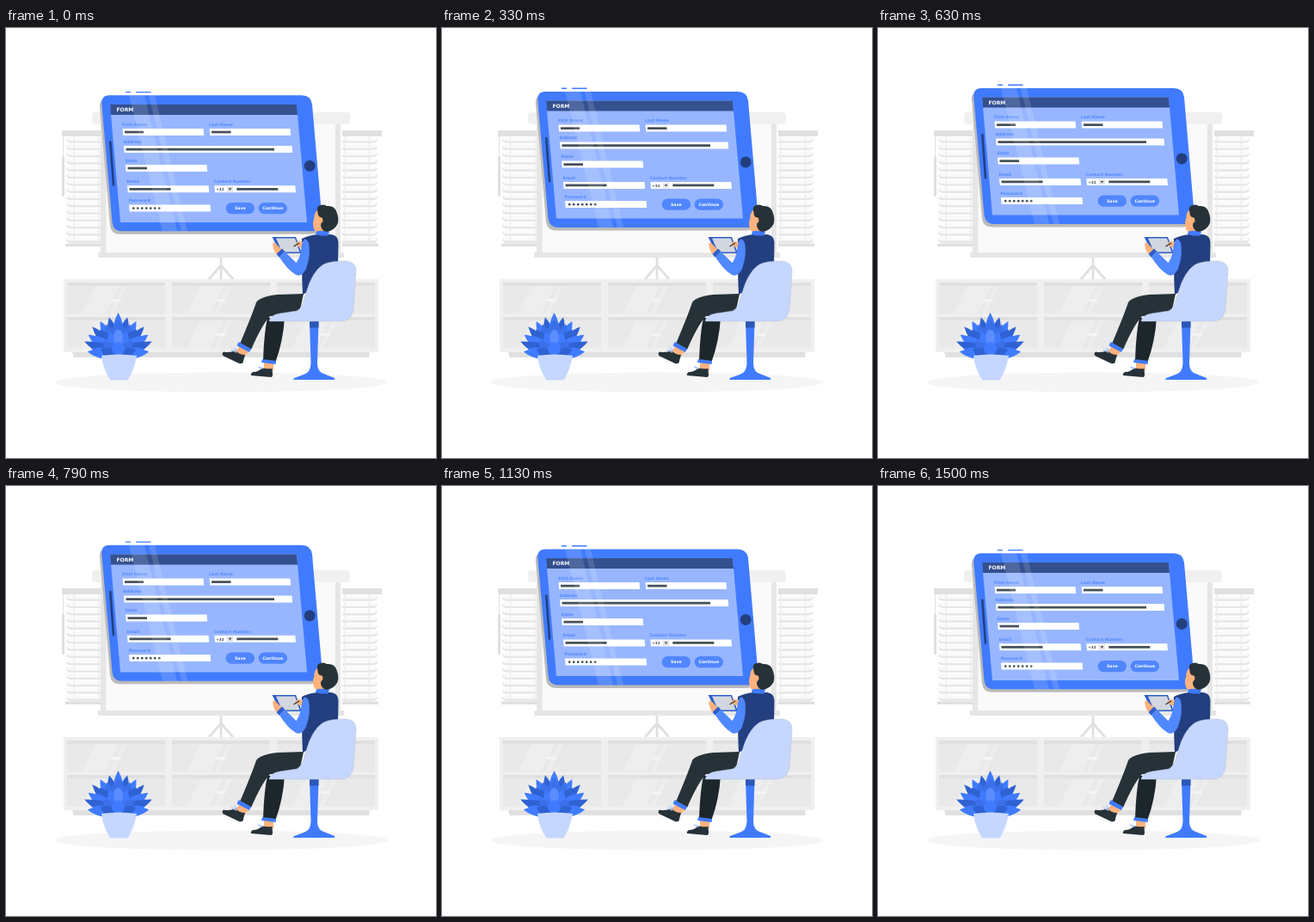
An HTML page that plays this animation: 500 px wide and 500 px high, repeating every 1540 ms.

```html
<!DOCTYPE html>
<html lang="en">
<head>
<meta charset="utf-8">
<title>Form on a tablet</title>
<style>
html, body { margin: 0; width: 100%; height: 100%; overflow: hidden; background: #fff; }
svg { display: block; width: 100%; height: 100%; }
text { font-family: "DejaVu Sans", Inter, sans-serif; font-weight: 700; font-size: 4.7px; }
.blue { fill: #407bff; }
.navy { fill: #233f80; }
.pale { fill: #c6d7ff; }
.dark { fill: #263238; }
.skin { fill: #ffb27d; }
.grey { fill: #e0e0e0; }
</style>
</head>
<body>
<svg viewBox="0 0 500 500">
  <ellipse cx="250" cy="412" rx="193.500" ry="11.500" fill="#f5f5f5"/>

  <g id="blind">
    <g id="slats"></g>
    <path d="M79.500 126V251M108 126V251" stroke="#ebebeb" stroke-width="1.200"/>
    <path class="grey" d="M65 119h46v7H65zM69 250.500h42v3.500H69z"/>
  </g>
  <use href="#blind" transform="matrix(-1 0 0 1 502 0)"/>
  <path d="M66.500 126v24" stroke="#e0e0e0"/>
  <rect class="grey" x="65" y="149" width="3" height="47" rx="1"/>

  <rect x="100" y="98" width="300" height="14" rx="4" fill="#f0f0f0"/>
  <path fill="#e6e6e6" d="M110 112h279v150H110z"/>
  <path fill="#fafafa" d="M116.500 112H383v150H116.500z"/>
  <rect x="107" y="261" width="286" height="6" rx="1" fill="#e6e6e6"/>
  <path d="M250 267v25M250 276L236 292M250 276L264 292" fill="none" stroke="#e0e0e0" stroke-width="2.800"/>

  <path fill="#f0f0f0" d="M67 292h366v85H67z"/>
  <path class="grey" d="M77 377h346l-1 6H79z"/>
  <g id="doors"></g>

  <g id="tablet">
    <path class="blue" d="M139 74h6v1.300h-6zM151 74h17.500v1.300H151z"/>
    <path fill="#bababa" transform="translate(-2.500 3.500)" d="M121 78.300H343Q354 78.300 355.300 89L367 225Q368 236.300 357 236.300H135Q124.500 236.300 123.500 226L111.500 89Q110.500 78.300 121 78.300z"/>
    <path class="blue" d="M120 78.300H344Q354.500 78.300 356 89L367.700 225Q368.500 236.300 358 236.300H135Q124.500 236.300 123.500 226L111.300 89Q110.500 78.300 120 78.300z"/>
    <path fill="#97b6ff" d="M121 89H338L350 226H133z"/>
    <path fill="#34508f" d="M121 89H338L339 101H122z"/>
    <path d="M121.300 132.500L125 182.500" stroke="#233f80" stroke-width="2.600" stroke-linecap="round"/>
    <circle class="navy" cx="353.200" cy="160.300" r="6.500"/>
    <text x="128.500" y="97.400" fill="#fff" style="font-size:6px">FORM</text>
    <g id="form"></g>
    <path fill="#fff" opacity=".13" d="M143 78.300h18L199 236.300h-17zM166 78.300h7L211 236.300h-7z"/>
  </g>

  <g id="plant"></g>

  <!-- person -->
  <path fill="#1c262b" d="M304 337H324Q322 365 313.500 388L299 386Q300 355 304 337z"/>
  <path class="dark" d="M346 309L316 310Q296 312 291 319Q286 334 272 367L285 374Q297 346 307 335Q326 335 341 332z"/>
  <path class="skin" d="M272 370L283 376L277 382L267 376zM300 389h11v9l-11 -1z"/>
  <path class="dark" d="M253 376.500Q250 379 253 381.500L271 390Q276 391 276 387L278 380Q271 380 267 375Q260 378 253 376.500zM287 400Q284 402 285 404L308 406Q310 406 310 403L309.500 396Q303 397 298 395Q294 400 287 400z"/>
  <path d="M262 374l6 3M265 372l4 3M293 394l6 2" stroke="#a8c5ff" stroke-width="1.500"/>
  <path class="blue" d="M270.500 365L285 373L283 377L268.500 369.500zM298 385L314 387L313.500 391L297 389z"/>

  <path class="skin" d="M363 229h11v11h-13z"/>
  <path class="navy" d="M344 245Q352 241 362 240H378Q386 241 386.500 249L386 278L352 306L345 310Q343.500 280 344 245z"/>
  <path class="blue" d="M361 235.500L376 236.500L374.500 241.500Q366 242 360 240z"/>
  <path class="skin" d="M363 211Q358 215 358.500 220L357 226Q357 234 360 236.500Q364 237 367 233L370 224z"/>
  <path class="dark" d="M362.500 214Q360 207 366 206Q370 204.500 373 207Q382 206 384.500 214Q387.500 222 385.500 228Q381 236 373 237Q367 236 366 230L367 221Q362 219 362.500 214z"/>
  <ellipse class="skin" cx="366" cy="223.500" rx="2.400" ry="3.300"/>

  <path fill="#2f5fc8" d="M309.500 243H337L344 262H319z"/>
  <path fill="#d2d7df" d="M314 244.500H336L341.500 260.500H321z"/>
  <path class="skin" d="M310 251Q312 248 315 252L321 258L319 265Q311 263 310 251zM336 251Q340 246 345 249V256L339 254z"/>
  <path d="M334.500 254L341 250" stroke="#263238" stroke-width="1.300"/>
  <path fill="#5088ff" d="M347 245.500Q343.500 249 343 260Q341 268 337.500 273L323 259L317 265Q327 281 337 287Q344 290 349 280Q355 262 352 250Q350 245 347 245.500z"/>
  <path fill="#2f5fc8" d="M321 256.500L324 259.500L317.500 266.500L314.500 263z"/>

  <!-- chair -->
  <path class="blue" d="M353 341H363.500L362 390Q362 401 372 403L382 407Q383.500 409 380 409H336Q333 409 335 407L346 403Q354 401 354.500 390z"/>
  <path fill="#2b57b8" d="M353 341h10.500v7.500H353z"/>
  <path class="pale" stroke="#b5bfd6" stroke-width=".5" d="M306 341Q307 334 318 332L338 329Q345 326 349 308Q356 283 369 275Q377 270.800 395 271Q407.500 272 407 283L404 327Q402 341 388 341z"/>
</svg>
<script>
const fill = (id, markup) => document.getElementById(id).innerHTML = markup;
const repeat = (n, make) => Array.from({ length: n }, (_, i) => make(i)).join('');

fill('slats', repeat(15, i => {
  const y = 127 + i * 8.3;
  return `<path fill="#fafafa" d="M70 ${y}H111v5H74Q70 ${y + 4} 70 ${y}z"/>
    <path fill="#e6e6e6" d="M70 ${y + 2}Q72 ${y + 4.4} 76 ${y + 4.4}H111v2.400H76Q70 ${y + 6.8} 70 ${y + 2}z"/>`;
}));

fill('doors', repeat(6, i => {
  const x = 71 + i % 3 * 122, y = i < 3 ? 296 : 336;
  return `<g transform="translate(${x} ${y})">
    <path fill="#e9e9e9" d="M0 0h114v36.500H0z"/>
    <path fill="#eee" d="M33 4H60L44 36.500H17zM65 4h5L54 36.500h-5z"/>
    <path class="grey" d="M0 0h114v4H0z"/>
    <rect x="51" y="19" width="11" height="3.200" rx="1.600" fill="#f5f5f5"/></g>`;
}));

// Form field: label, left edge, top edge, width, length of the filled-in bar
const field = (label, x, y, w, bar, indent = 2.5) => `
  <text x="${x - .5}" y="${y - 3.2}" fill="#5389ff">${label}</text>
  <path fill="#fff" d="M${x} ${y}h${w}l.7 8h${-w}z"/>
  <path fill="#454f5b" d="M${x + indent} ${y + 2.7}h${bar}v2.700h${-bar}z"/>`;
const button = (label, x) => `
  <rect x="${x - 16.7}" y="203" width="33.400" height="13.200" rx="6.600" fill="#5086ff"/>
  <text x="${x}" y="211.400" fill="#fff" text-anchor="middle">${label}</text>`;

fill('form',
  field('First Name', 135.5, 117, 94, 22) +
  field('Last Name', 236.5, 117, 94, 22.5) +
  field('Address', 137, 137, 195.5, 172.5) +
  field('State', 139, 159, 94.5, 22.5) +
  field('Email', 141, 183.3, 94.5, 48) +
  field('Contact Number', 242.3, 183.3, 94, 48, 26) +
  field('Password', 143, 205.5, 94.5, 0) +
  `<text x="244.300" y="189" fill="#454f5b" style="font-size:4.200px">+32</text>
   <path fill="#e3e3e3" d="M257 184.500h7v6h-7z"/>
   <path fill="#454f5b" d="M258.500 186.300h4l-2 2.400z"/>` +
  repeat(7, i => `<circle cx="${148.2 + i * 5}" cy="209.600" r="1.350" fill="#454f5b"/>`) +
  button('Save', 272.3) + button('Continue', 310.3));

// Petals fan out from the pot, mirrored around its axis
const petal = (angle, length, width, color) =>
  `<path transform="translate(130.500 382) rotate(${angle})" fill="${color}"
    d="M0 0C${-width} ${-length * .3} ${-width} ${-length * .7} 0 ${-length}C${width} ${-length * .7} ${width} ${-length * .3} 0 0z"/>`;
const pair = (angle, ...shape) => petal(-angle, ...shape) + petal(angle, ...shape);
const MID = '#407bff', DEEP = '#2f62d2', SOFT = '#3a70ea';
fill('plant',
  pair(13, 47, 8, DEEP) + petal(0, 51, 9, MID) +
  pair(27, 46, 8, MID) + pair(41, 46, 7, DEEP) +
  pair(54, 43, 8, MID) + pair(66, 43, 7, DEEP) + pair(81, 36, 7, MID) +
  pair(20, 40, 9, SOFT) + pair(34, 38, 9, DEEP) +
  pair(48, 36, 8, MID) + pair(61, 34, 8, DEEP) + pair(74, 32, 7, MID) +
  petal(0, 43, 12, SOFT) + pair(20, 30, 9, MID) +
  `<ellipse cx="130.500" cy="359.500" rx="5.500" ry="8.500" fill="#5a8dff"/>` +
  pair(45, 25, 8, SOFT) + pair(68, 22, 7, DEEP) + petal(0, 17, 10, MID) +
  `<path class="pale" d="M111 381Q131 378 152 381Q149 398 141.500 409.500H121.500Q113 398 111 381z"/>`);

const LOOP = 1540, FLOAT = 1500, RISE = 10;
const tablet = document.getElementById('tablet');
function draw() {
  const p = Math.min(1, performance.now() % LOOP / FLOAT);
  const lift = RISE * (1 - Math.abs(2 * p - 1));
  tablet.setAttribute('transform', `translate(0 ${-lift})`);
  requestAnimationFrame(draw);
}
draw();
</script>
</body>
</html>
```
